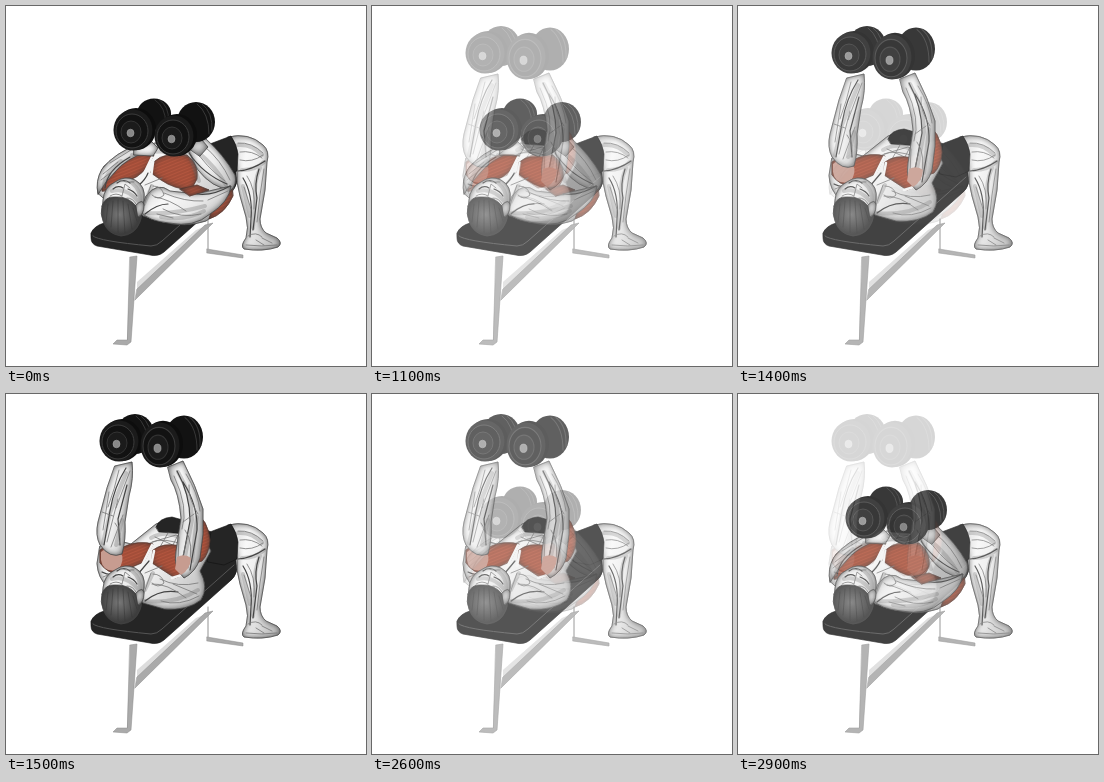
Recreate the animation shown at these times as an HTML page. Size 360x360 px, loop 3000 ms.

```html
<!DOCTYPE html>
<html lang="en">
<head>
<meta charset="utf-8">
<title>Dumbbell press</title>
<style>
html, body { margin: 0; width: 100%; height: 100%; overflow: hidden; background: #fff; }
svg { display: block; width: 100%; height: 100%; }
path { stroke-linejoin: round; stroke-linecap: round; }
.skin { fill: url(#skin); stroke: #4c4c4c; stroke-width: .7; filter: url(#volume); }
.muscle { fill: url(#fibres); stroke: #65382d; stroke-width: .6; filter: url(#volume); }
.pale { fill: #c79c90; stroke: none; }
.black { fill: #252525; stroke: #111; stroke-width: .6; }
.metal { fill: #aaa; stroke: #888; stroke-width: .5; }
.line { fill: none; stroke: #777; stroke-width: .8; }
.dark { fill: none; stroke: #444; stroke-width: 1.2; }
.shade { fill: none; stroke: #666; stroke-width: 4; opacity: .3; }
.light { fill: none; stroke: #f4f4f4; stroke-width: 2.5; }
</style>
</head>
<body>
<svg viewBox="0 0 360 360">
<defs>
  <linearGradient id="skin" x1="0" y1="0" x2="1" y2=".5">
    <stop offset="0" stop-color="#d0d0d0"/><stop offset=".35" stop-color="#f8f8f8"/>
    <stop offset=".65" stop-color="#ececec"/><stop offset="1" stop-color="#c8c8c8"/>
  </linearGradient>
  <radialGradient id="hair" cx=".45" cy=".45">
    <stop offset="0" stop-color="#777"/><stop offset="1" stop-color="#3d3d3d"/>
  </radialGradient>
  <pattern id="fibres" width="4" height="3" patternUnits="userSpaceOnUse" patternTransform="rotate(-22)">
    <path d="M0 0h4v3H0z" fill="#b3563f"/><path d="M0 1h4" stroke="#8d402e" stroke-width=".8"/>
  </pattern>
  <!-- Soft shadow along the inside of the outline -->
  <filter id="volume" color-interpolation-filters="sRGB">
    <feGaussianBlur in="SourceAlpha" stdDeviation="3"/>
    <feComposite in="SourceAlpha" operator="out" in2="" result="edge"/>
    <feGaussianBlur in="SourceAlpha" stdDeviation="3" result="soft"/>
    <feComposite in="SourceAlpha" in2="soft" operator="out" result="edge"/>
    <feFlood flood-color="#333" flood-opacity=".9"/>
    <feComposite in2="edge" operator="in" result="shadow"/>
    <feMerge><feMergeNode in="SourceGraphic"/><feMergeNode in="shadow"/></feMerge>
  </filter>

  <g id="back">
    <ellipse rx="19" ry="20" fill="#121212"/>
    <path d="M6 -18Q17 -10 16 9M1 -18Q13 -9 13 12" fill="none" stroke="#383838"/>
  </g>
  <g id="plate">
    <ellipse cx="2" cy="-1" rx="20" ry="21" fill="#0d0d0d"/>
    <ellipse cx="-1" rx="19.5" ry="20.5" fill="#1b1b1b"/>
    <ellipse cx="-2" cy="1" rx="16" ry="17" fill="#121212" stroke="#3c3c3c"/>
    <ellipse cx="-3" cy="2" rx="10" ry="11" fill="#1b1b1b" stroke="#333"/>
    <ellipse cx="-3.5" cy="3" rx="3.5" ry="3.8" fill="#888" stroke="#aaa" stroke-width=".6"/>
  </g>

  <g id="bench">
    <path class="line" d="M202 213v30"/>
    <path class="metal" d="M201 243l36 6v3l-36-5z"/>
    <path d="M131 276L190 224l10-4-69 63z" fill="#ddd"/>
    <path class="metal" d="M131 283L199 219l8-2-78 77z"/>
    <path class="metal" d="M124 251l7-1-6 86-4 3-14-1 4-4h10z"/>
    <path class="black" d="M85 227Q88 220 98 217L150 170 190 145 228 150 231 176Q229 184 223 188L158 246Q152 251 144 249L91 240Q85 238 85 232z"/>
    <path d="M87 230Q92 235 145 240 151 240 156 235L228 171" fill="none" stroke="#555"/>
  </g>

  <g id="leg">
    <path class="skin" d="M222 131Q243 126 257 139 264 145 261 156L259 184 254 213Q254 222 260 227L271 232Q277 237 272 241 257 246 238 243 234 240 240 232 243 222 240 211L234 190Q230 177 231 164z"/>
    <path class="black" d="M196 141L225 130Q231 139 232 148L231 165 218 171 202 168z"/>
    <path class="shade" d="M236 164Q250 164 258 156M254 162Q248 175 249 193L247 222M237 180l7 30M232 139Q246 138 256 149"/>
    <path class="dark" d="M232 165Q246 164 259 155M237 172Q247 188 245 213L244 231M253 163Q248 178 251 192L247 224"/>
    <path class="line" d="M241 170Q250 183 248 203M258 163l-4 26-3 27M242 230q8-5 14 1M240 239q16 2 31 0M238 181l7 22M232 137q14-1 25 10M234 154q12 3 23-5M234 146q12-2 22 6M250 234l8 5m-2-7 10 5"/>
  </g>

  <g id="head">
    <path class="skin" d="M97 194Q98 181 109 176 119 169 129 174 140 180 138 194L133 213Q119 198 97 199z"/>
    <path class="shade" d="M106 185q15-4 27 11M126 177q9 7 8 18"/>
    <path class="dark" d="M107 183q5-4 10-1m5 1q6 2 9 7M111 177q7-5 13 0"/>
    <path class="line" d="M116 190l3-12 5 4M104 190q6-4 12 0m5 2q6 0 9 6M113 174q7 3 15 2"/>
    <path d="M96 200Q99 190 109 191 122 190 130 200 138 207 134 216 129 229 115 230 101 228 97 215 94 208 96 200z" fill="url(#hair)" stroke="#444" stroke-width=".8"/>
    <path d="M102 198l-2 18M107 195l-2 26M112 194v32M117 195l2 32M122 198l4 25M127 202l4 13" fill="none" stroke="#333" stroke-width=".8" opacity=".6"/>
    <path class="skin" d="M130 199q7-7 8 0 0 10-6 12z"/>
  </g>
</defs>

<rect width="360" height="360" fill="#fff"/>

<g id="lowered">
  <use href="#bench"/><use href="#leg"/>
  <path class="skin" d="M92 187Q91 171 98 160L117 146 149 137 184 134Q204 145 222 165 231 177 226 187 216 205 200 215 179 222 157 216L137 210 121 184 101 195z"/>
  <path class="muscle" d="M226 182Q218 194 206 203L203 213Q219 208 227 190z"/>
  <path class="muscle" d="M96 185Q94 178 104 170 111 157 124 151 136 146 148 149L141 161Q132 173 119 175L107 184zM149 155Q158 146 181 149 193 158 191 173L185 184Q168 183 155 174L145 167z"/>
  <path class="light" d="M146 151l-11 23M147 156l-2 16M163 183q15 11 29 1"/>
  <path class="skin" d="M92 188Q89 175 96 163 108 147 135 137L143 145Q119 153 109 166L100 176z"/>
  <path class="skin" d="M180 139L199 132Q218 149 229 169 231 179 225 184 206 182 192 164z"/>
  <path class="skin" d="M140 190Q151 175 164 185L190 188 225 180Q223 196 204 208 188 222 163 217 142 215 135 206z"/>
  <path class="muscle" d="M174 183L191 179 203 184 184 190z"/>
  <path class="shade" d="M142 207Q166 209 199 200M192 146Q210 161 220 179M98 181q0-14 17-26M146 180l-8 18M155 211q25 4 43-6M126 149q28-7 56 0M183 147l10 28"/>
  <path class="dark" d="M132 180q8-7 10-13M139 208Q151 198 162 198M183 147q14 21 38 31M191 188Q207 190 224 180M99 182Q101 164 124 151"/>
  <path class="line" d="M149 191q14 2 31 14M158 187q21 9 39 8M157 203q18 10 38 5M198 140q17 14 26 34M188 142q12 19 31 33M202 194l20-9M139 179l17-7M147 180q9 0 11 9-6 6-12 0M95 174l13-10M104 157l21-13M97 168l15-12M138 199l7-20M151 208l16 4"/>
  <path class="skin" d="M128 142l17-7 7 7-5 8-19-1zM181 141l14-8 7 8-8 9z"/>
  <use href="#head"/>
  <path d="M134 122l16-17M170 128l20-13" stroke="#191919" stroke-width="15"/>
  <use href="#back" transform="translate(148 108) scale(.9 .78)"/>
  <use href="#plate" x="128" y="124"/>
  <use href="#back" x="190" y="116"/>
  <use href="#plate" x="169" y="130"/>
</g>

<g id="raised">
  <use href="#bench"/><use href="#leg"/>
  <path class="skin" d="M94 152Q105 143 125 150L150 130Q170 119 194 136L205 157 194 177Q203 193 195 206 181 217 158 215L137 209 123 185 101 192Q92 184 91 170z"/>
  <path class="black" d="M150 133Q153 124 166 123L184 128 205 138 202 153 181 140 153 138z"/>
  <path class="line" d="M146 148l24-7 11 6M144 149q14-7 36 3M149 143l22 10M162 139l-8 14M172 141l-7 14"/>
  <path class="shade" d="M145 144q15-9 31 1l6 12M139 207Q170 210 192 196M147 179l-8 17"/>
  <path class="muscle" d="M94 156Q105 147 117 153 132 146 147 150L138 168Q123 174 115 179 102 181 94 169zM147 156Q157 148 175 152L184 158Q191 169 182 179L169 184 146 169z"/>
  <path class="pale" d="M95 158q10-8 20 0 4 9-3 18-15 3-17-10z"/>
  <path class="light" d="M146 151l-12 24M148 157l-3 15M166 184l16-5"/>
  <path class="skin" d="M109 72L126 68Q128 84 123 102L119 128Q120 146 116 160 104 165 94 151 89 141 92 128L101 94z"/>
  <path class="shade" d="M120 79L104 119l-7 30M116 126l-6 25"/>
  <path class="dark" d="M120 74Q108 93 104 117L98 151M121 91l-9 34 2 26"/>
  <path class="line" d="M113 76q-4 18-11 37M124 77l-14 37M103 98l-6 38M112 105l-11 43M117 121l-12 32M107 122l-11-4M109 129q8 10 4 22"/>
  <path class="muscle" d="M190 122Q201 123 204 146 203 160 196 167L187 170z"/>
  <path class="skin" d="M162 73L177 67Q190 92 197 115L197 140 194 164Q190 178 178 184 167 174 170 157L175 124Q173 99 165 86z"/>
  <path class="shade" d="M172 78q14 23 14 48l-9 47M191 123l-5 44"/>
  <path class="dark" d="M171 77q13 23 13 50l-9 47M177 88q15 23 14 48l-7 40"/>
  <path class="line" d="M168 82q15 32 8 53M180 80q12 19 14 37M183 91q-1 14 9 29M177 128l11-8M179 136q10 13 3 38M173 143l-1 25M181 145l-7 29"/>
  <path class="pale" d="M171 163q8-4 14 1-1 12-10 17l-6-6z"/>
  <path class="dark" d="M96 178q8 5 24 0M132 180l11-13M139 207q15-12 33-9"/>
  <path class="line" d="M146 190q15-1 34 14M154 185q18 9 38 4M155 207q18 6 38-5M139 179l17-7M147 180q9 0 11 9-6 6-12 0M97 183l15-6M138 199l7-20M167 190l24 10"/>
  <use href="#head"/>
  <path d="M115 47l14-6M157 51l22-8" stroke="#191919" stroke-width="15"/>
  <use href="#back" x="129" y="40"/>
  <use href="#plate" x="114" y="47"/>
  <use href="#back" transform="translate(178 43) scale(1 1.08)"/>
  <use href="#plate" transform="translate(155 51) scale(1 1.1)"/>
</g>
</svg>
<script>
const lowered = document.getElementById('lowered');
const raised = document.getElementById('raised');
const fadeSteps = 6, stepTime = 100;
const steppedFade = time => Math.min(1, Math.max(0, Math.floor(time / stepTime) + 1) / fadeSteps);

function draw(now) {
  const time = now % 3000;
  const mix = steppedFade(time - 1000) - steppedFade(time - 2500);
  lowered.style.opacity = 1 - mix;
  raised.style.opacity = mix;
  requestAnimationFrame(draw);
}
draw(0);
</script>
</body>
</html>
```
